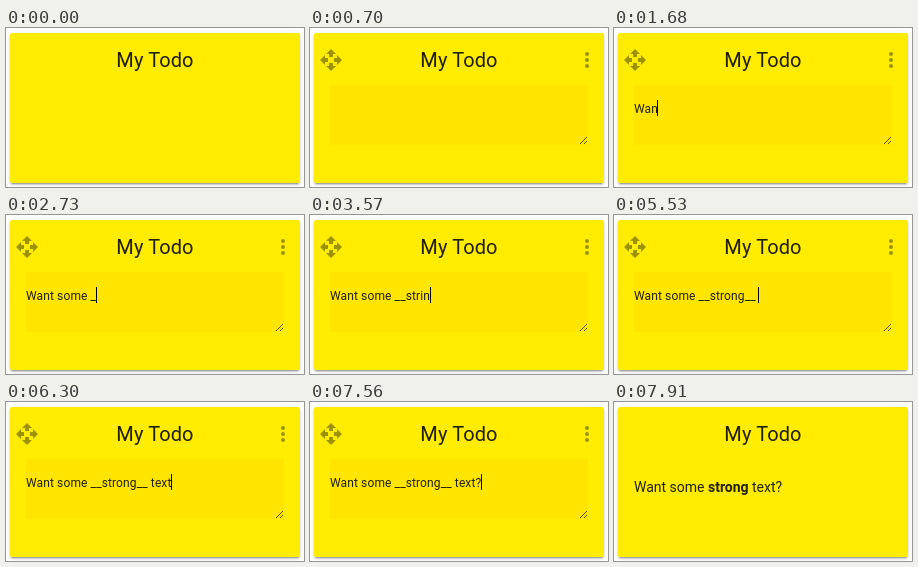
An HTML page that plays this animation: 298x159 px, repeating every 9.8 s.

```html
<!DOCTYPE html>
<html lang="en">
<head>
<meta charset="utf-8">
<title>Todo note</title>
<style>
  html, body { margin: 0; width: 100%; height: 100%; overflow: hidden; background: #fff; }
  body { position: relative; font-family: Roboto, sans-serif; color: rgba(0, 0, 0, .87); }
  div, svg { position: absolute; }
  .card {
    left: 4px; top: 5px; width: 290px; height: 150px; border-radius: 2px;
    background: #ffec00;
    box-shadow: 0 2px 2px 0 rgba(0, 0, 0, .14), 0 3px 1px -2px rgba(0, 0, 0, .2), 0 1px 5px 0 rgba(0, 0, 0, .12);
  }
  .title {
    left: 4px; top: 20px; width: 290px; text-align: center;
    font-size: 20px; line-height: 24px; letter-spacing: .005em;
  }
  .field { left: 20px; top: 57px; width: 258px; height: 60px; background: #ffe500; }
  .line { left: 20px; white-space: pre; }
  #typed { top: 73px; font-size: 12px; line-height: 16px; letter-spacing: .01em; }
  #result { top: 75px; font-size: 14px; line-height: 20px; }
  #caret { top: 72px; width: 1px; height: 16px; background: #000; }
  svg { left: 0; top: 0; }
</style>
</head>
<body>
<div class="card"></div>
<div class="title">My Todo</div>
<div class="field" id="field">
  <svg width="258" height="60" fill="none" stroke="#5c5300" stroke-width="1">
    <path d="M250 59l7-7M254 59l3-3"/>
  </svg>
</div>
<svg id="icons" width="298" height="159" fill="#000" fill-opacity=".38">
  <path transform="translate(9 20)" d="M10 9h4V6h3l-5-5-5 5h3v3zm-1 1H6V7l-5 5 5 5v-3h3v-4zm14 2l-5-5v3h-3v4h3v3l5-5zm-9 3h-4v3H7l5 5 5-5h-3v-3z"/>
  <circle cx="277" cy="26" r="2"/>
  <circle cx="277" cy="32" r="2"/>
  <circle cx="277" cy="38" r="2"/>
</svg>
<div class="line" id="typed"></div>
<div id="caret"></div>
<div class="line" id="result">Want some <b>strong</b> text?</div>
<script>
  const LOOP = 9800;
  const EDIT_END = 7630;
  const [field, icons, typed, caret, result] =
    ['field', 'icons', 'typed', 'caret', 'result'].map(id => document.getElementById(id));

  // Each key press: [time, character]; '<' deletes backwards.
  const keys = [
    [1400, 'W'], [1540, 'a'], [1680, 'n'], [1820, 't'], [1960, ' '],
    [2030, 's'], [2170, 'o'], [2310, 'm'], [2380, 'e'], [2450, ' '],
    ...[...'__string'].map((c, i) => [2730 + 140 * i, c]),
    [4130, '<'], [4270, '<'], [4410, '<'],
    [4620, 'o'], [4690, 'n'], [4830, 'g'],
    [5180, '_'], [5320, '_'], [5530, ' '], [5670, 't'], [5810, 'e'],
    [6090, 'x'], [6300, 't'], [6790, '?']
  ];

  // Stepped opacity of the hover controls: [time, value].
  const fade = [[0, 0], [560, .35], [630, .75], [700, 1], [7840, .4], [7910, 0]];

  const textAt = t => keys.reduce((s, [at, c]) =>
    at > t ? s : c === '<' ? s.slice(0, -1) : s + c, '');
  const stepAt = (steps, t) => steps.filter(([at]) => at <= t).pop()[1];
  const show = (el, on) => { el.style.visibility = on ? 'visible' : 'hidden'; };

  function draw(t) {
    const editing = t < EDIT_END;
    const alpha = stepAt(fade, t);
    const text = textAt(t);
    icons.style.opacity = alpha;
    field.style.opacity = editing ? alpha : 0;
    if (typed.textContent !== text) {
      typed.textContent = text;
      caret.style.left = Math.floor(typed.getBoundingClientRect().right) + 'px';
    }
    const blinkedOff = t >= 7280 && t < 7560;
    show(typed, editing);
    show(caret, editing && text !== '' && !blinkedOff);
    show(result, !editing);
  }

  const start = performance.now();
  function tick() {
    draw((performance.now() - start) % LOOP);
    requestAnimationFrame(tick);
  }
  tick();
</script>
</body>
</html>
```
